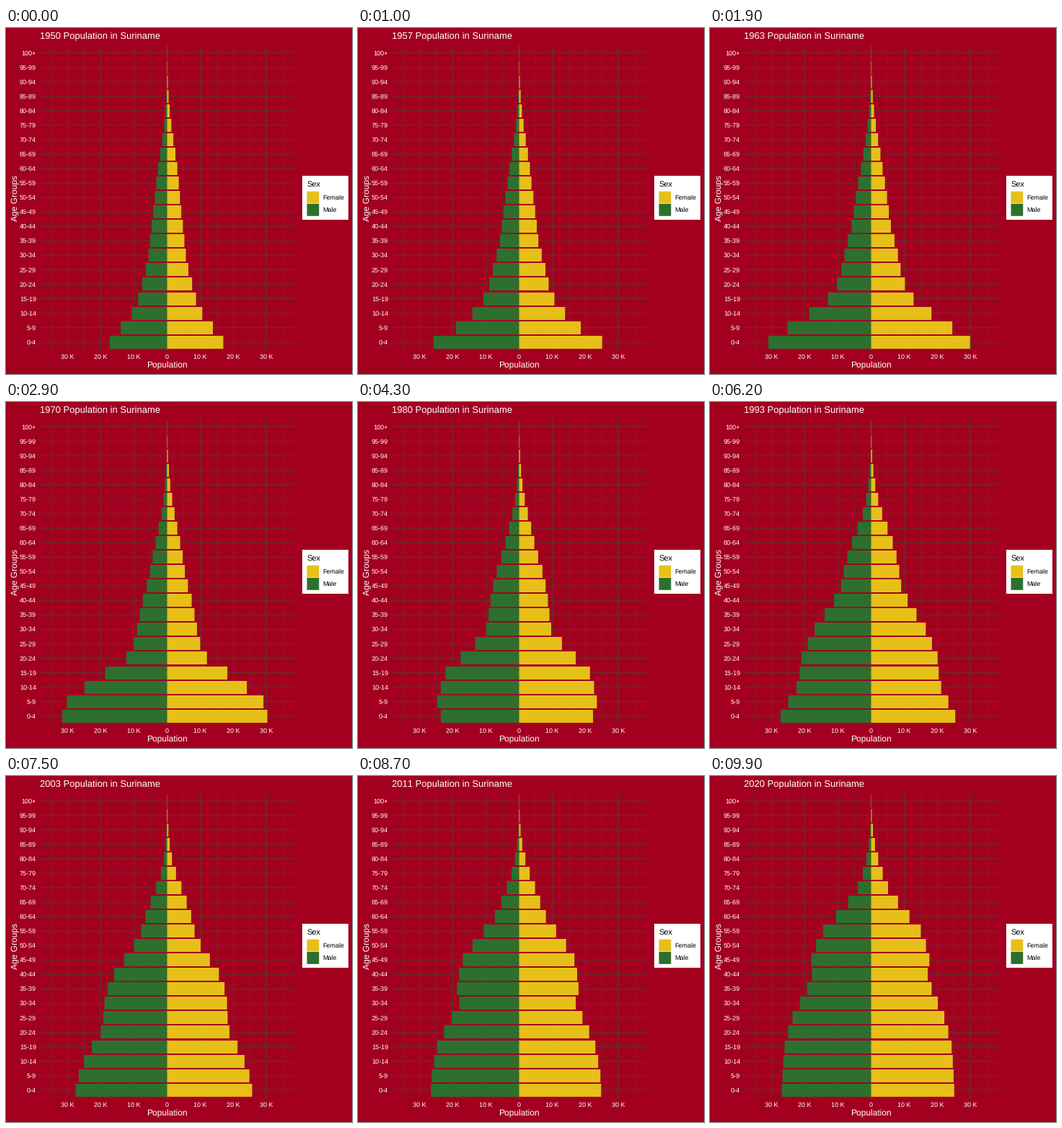
Animation, 480 px wide and 480 px high, one loop 10000 ms. Source, as a matplotlib script:

```python
import matplotlib.pyplot as plt
import numpy as np
from matplotlib.animation import FuncAnimation
from matplotlib.patches import Rectangle

plt.rcParams.update({"font.family": "Liberation Sans", "text.hinting": "none",
                     "text.hinting_factor": 1})

SIZE, FRAMES, INTERVAL = 480, 100, 100
FIRST, LAST = 1950, 2020
RED, YELLOW, GREEN, GRID = "#A30020", "#E6BF19", "#2D6F2E", "#5C382B"

LEFT, RIGHT, TOP, BOTTOM = 46.4, 400.6, 23.4, 447.7
ZERO, PER_K = 223.5, 4.595
ROW0, STEP = 435.68, 20.05
GROUPS = [f"{a}-{a + 4}" for a in range(0, 100, 5)] + ["100+"]
AGES = np.arange(len(GROUPS)) * 5 + 2.5
ROWS = ROW0 - np.arange(len(GROUPS)) * STEP

# Settled size of each birth cohort, in thousands of men.
BORN = [1860, 1900, 1920, 1930, 1938, 1948, 1958, 1963, 1973, 1979, 1983,
        1993, 2003, 2020]
COHORT = [3, 4.3, 6, 8.1, 9.1, 9.9, 15.4, 18.2, 19.6, 18.5, 20.2,
          24.2, 25.8, 26.5]


def falling(x, mid, width):
    return 1 / (1 + np.exp((x - mid) / width))


def alive(mid):
    return np.maximum(falling(AGES, mid, 8) - .017, 0)


def pyramid(year):
    """Thousands of men and women per age group."""
    born = year - AGES
    # Young people who have not emigrated yet.
    excess = np.interp(year, [1950, 1957, 1970, 1980, 1994, 2011],
                       [.95, 1, .73, .29, .18, .04])
    leaving_age = np.interp(year, [1950, 1970, 1980], [8, 20.5, 24])
    people = np.interp(born, BORN, COHORT)
    people *= 1 + excess * falling(AGES, leaving_age, 3.5)
    ratio = np.interp(born, [1930, 1990], [1, .93])
    return people * alive(70), people * ratio * alive(74)


fig = plt.figure(figsize=(SIZE / 72, SIZE / 72), dpi=72, facecolor=RED)
ax = fig.add_axes([0, 0, 1, 1])
ax.set(xlim=(0, SIZE), ylim=(SIZE, 0))
ax.axis("off")


def label(x, y, text, size, color="white", ha="left", va="baseline", **kw):
    return ax.text(x, y, text, fontsize=size, color=color, ha=ha, va=va, **kw)


def box(x, y, w, h, color, z=3):
    patch = Rectangle((x, y), w, h, fc=color, lw=0, zorder=z, snap=False)
    return ax.add_patch(patch)


def grid_line(xs, ys, width):
    ax.plot(xs, ys, color=GRID, lw=width, zorder=1, snap=False,
            solid_capstyle="butt")


for y, name in zip(ROWS, GROUPS):
    grid_line([LEFT, RIGHT], [y, y], 1.07)
    label(42, y + 3, name, 9, ha="right")

for k in range(-35, 36, 5):
    x = ZERO + k * PER_K
    major = k % 10 == 0
    grid_line([x, x], [TOP, BOTTOM], 1.07 if major else .55)
    if major:
        label(x, 458.9, f"{abs(k)} K" if k else "0", 9, ha="center")

title = label(47, 15, "", 13.2)
label(ZERO, 472, "Population", 12, ha="center")
label(17.6, 236, "Age Groups", 12, ha="right", va="center", rotation=90)

box(411, 205, 64, 61, "white")
label(417, 220, "Sex", 11, "black")
for y, color, name in ((226.7, YELLOW, "Female"), (244, GREEN, "Male")):
    box(417.5, y, 16.8, 16.8, color, 4)
    label(439.6, y + 11.3, name, 8.8, "black")


def bars(color):
    return [box(ZERO, np.round(y - .45 * STEP), 0, 18, color) for y in ROWS]


males, females = bars(GREEN), bars(YELLOW)


def update(i):
    year = FIRST + (LAST - FIRST) * i / (FRAMES - 1)
    title.set_text(f"{int(year + 1e-6)} Population in Suriname")
    men, women = pyramid(year)
    for m, f, left, right in zip(males, females, men, women):
        m.set_width(-left * PER_K)
        f.set_width(right * PER_K)
    return [title, *males, *females]


anim = FuncAnimation(fig, update, frames=FRAMES, interval=INTERVAL,
                     repeat=True, repeat_delay=0, blit=False)
plt.show()
```
